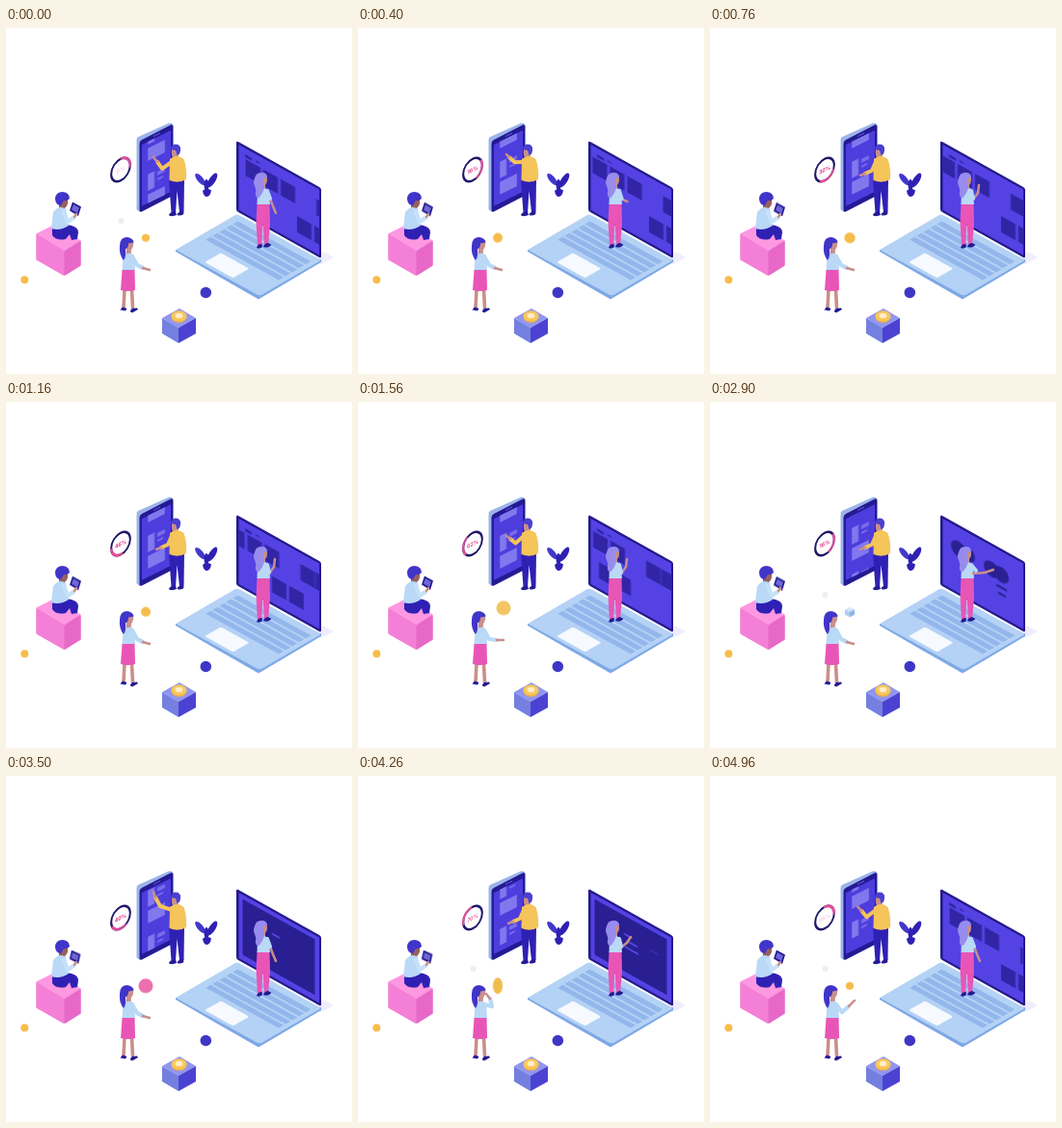
An HTML page that plays this animation: 359x359 px, repeating every 5 s.

```html
<!DOCTYPE html>
<html lang="en">
<head>
<meta charset="utf-8">
<title>Isometric workspace</title>
<style>
html, body { margin: 0; width: 100%; height: 100%; overflow: hidden; background: #fff; }
svg { display: block; width: 100%; height: 100%; }
.navy { fill: #241a94; }
.blue { fill: #2f20b4; }
.pale { fill: #b9d9f7; }
.pink { fill: #e955b6; }
.skin { fill: #c98f8a; }
.gold { fill: #f5c45a; }
.arm { fill: none; stroke-linecap: round; stroke-linejoin: round; }
.bare { stroke: #c98f8a; stroke-width: 2.5; }
.anim { animation: 5s ease-in-out infinite; }

#arc { animation: spin 2.5s linear infinite; }
@keyframes spin { from { transform: rotate(-90deg); } to { transform: rotate(270deg); } }

/* phone: three swipes per loop */
#feed { animation-name: feed; }
@keyframes feed {
  0% { transform: translateY(0); } 7%, 31.2% { transform: translateY(-13px); }
  38%, 58% { transform: translateY(-21px); } 70% { transform: translateY(-33px); }
  78%, 91% { transform: translateY(-41px); } 99%, 100% { transform: translateY(-48px); }
}
#manArm, #manHand { animation: manArm calc(5s / 3) linear infinite; }
#manHand { animation-name: manHand; }
@keyframes manArm {
  0%, 100% { d: path('M172 139L162 146L157 139'); }
  10% { d: path('M172 139L160 135L155 126'); animation-timing-function: ease-in-out; }
  45%, 74% { d: path('M172 139L168 148L161 151'); }
}
@keyframes manHand {
  0%, 100% { d: path('M157 139L153 134'); }
  10% { d: path('M155 126L153 120'); animation-timing-function: ease-in-out; }
  45%, 74% { d: path('M161 151L156 153'); }
}

/* laptop */
#tiles { animation-name: tiles; }
@keyframes tiles { 0%, 42%, 97%, 100% { opacity: 1; } 46%, 93% { opacity: 0; } }
#row1 { animation-name: row1; }
@keyframes row1 {
  0%, 60%, 100% { transform: none; } 15.2% { transform: translateX(-10px); }
  31.2%, 50% { transform: translateX(-23px); }
}
#row2 { animation-name: row2; }
@keyframes row2 {
  0%, 15.2%, 60%, 100% { transform: none; } 31.2%, 50% { transform: translateX(-52px); }
}
#discs { animation-name: discs; }
@keyframes discs { 0%, 46%, 64%, 100% { opacity: 0; } 51%, 60% { opacity: 1; } }
#night { animation-name: night; }
@keyframes night { 0%, 60%, 97%, 100% { opacity: 0; } 67%, 92% { opacity: 1; } }
.line { animation-name: line; }
@keyframes line { 0%, 68% { transform: scaleX(0); } 82%, 100% { transform: scaleX(1); } }
#ladySleeve { animation-name: ladySleeve; }
@keyframes ladySleeve {
  0%, 4%, 70%, 76%, 98%, 100% { d: path('M271 169L274 177'); }
  13%, 35%, 84%, 90% { d: path('M271 169L273 177'); }
  52%, 60% { d: path('M271 169L276 175'); }
}
#ladyArm { animation-name: ladyArm; }
@keyframes ladyArm {
  0%, 4%, 70%, 76%, 98%, 100% { d: path('M274 177L277 185L280 192'); }
  13%, 35% { d: path('M273 178L278 171L279 163'); }
  52%, 60% { d: path('M273 178L285 177L294 174'); }
  84%, 90% { d: path('M273 178L279 173L283 167'); }
}

/* presenter */
#girlSleeve { animation-name: girlSleeve; }
@keyframes girlSleeve {
  0%, 24%, 40%, 73%, 100% { d: path('M131 237L136 246L142 249'); }
  31.2% { d: path('M131 237L136 246L144 247'); }
  82%, 92% { d: path('M131 237L139 239L137 231'); }
  99.5% { d: path('M131 237L137 245L144 239'); }
}
#girlHand { animation-name: girlHand; }
@keyframes girlHand {
  0%, 24%, 40%, 73%, 100% { d: path('M142 249L149 251'); }
  31.2% { d: path('M144 247L151 247'); }
  82%, 92% { d: path('M137 231L133 226'); }
  99.5% { d: path('M144 239L150 233'); }
}

/* floating tokens */
#ball { animation-name: ball; }
@keyframes ball {
  0%, 98%, 100% { transform: scale(1); } 15.2%, 22% { transform: scale(1.38); }
  27%, 91% { transform: scale(0); }
}
#burst { animation-name: burst; }
@keyframes burst { 0%, 25%, 46%, 100% { transform: scale(0); } 31.2%, 40% { transform: scale(1); } }
#box { animation-name: box; }
@keyframes box { 0%, 47%, 64%, 100% { transform: scale(0); } 54%, 59% { transform: scale(1); } }
#rose { animation-name: rose; }
@keyframes rose { 0%, 62%, 79%, 100% { transform: scale(0); } 68%, 73% { transform: scale(1); } }
#coin { animation-name: coin; }
@keyframes coin {
  0%, 76%, 93%, 100% { transform: scale(0); } 81% { transform: scale(.9, 1); }
  85.2% { transform: scale(.6, 1); } 89% { transform: scale(.2, .8); }
}
#dot { animation-name: dot; }
@keyframes dot { 0%, 58%, 84%, 100% { opacity: 1; } 8%, 45%, 67%, 76% { opacity: 0; } }
#tablet { animation-name: tablet; }
@keyframes tablet { 0%, 31%, 100% { transform: none; } 15%, 58% { transform: translateY(.5px); } 70%, 85% { transform: rotate(-5deg); } }
</style>
</head>
<body>
<svg viewBox="0 0 359 359">
  <defs>
    <clipPath id="phoneClip"><path d="M0 0H30V64H0Z"/></clipPath>
    <clipPath id="screenClip"><path d="M2.500 2.500H86V70.500H2.500Z"/></clipPath>
    <g id="cards" fill="#8178ee">
      <path d="M6 7H24V20H6ZM6 34H13V51H6Z"/>
      <path d="M16 36H24V40H16ZM16 43H22V45H16Z" opacity=".8"/>
    </g>
  </defs>

  <!-- loose balls -->
  <circle cx="19.300" cy="261.300" r="4" fill="#f7bd4c"/>
  <circle cx="207.300" cy="274.500" r="5.800" fill="#3f36c6"/>
  <circle id="dot" class="anim" cx="119.500" cy="200" r="3" fill="#ededf5"/>

  <!-- progress ring -->
  <g transform="matrix(.87 -.42 0 1 119 147)">
    <circle r="11.300" fill="#fff" stroke="#1d1668" stroke-width="2.400"/>
    <circle id="arc" r="11.300" fill="none" stroke="#ee4f9d" stroke-width="2.400" pathLength="100" stroke-dasharray="28 72"/>
    <text id="count" y="2.300" text-anchor="middle" font-family="Inter, Roboto, sans-serif" font-size="6" font-weight="700" fill="#e2368c"></text>
  </g>

  <!-- phone -->
  <path d="M135.500 116Q135.500 114 137 113L169 98.800Q172 98.500 173 100L139 118V191L135.500 188.500Z" fill="#9db4ea"/>
  <path class="navy" d="M138.500 120Q138.500 117 141 116L171 100.500Q173.500 99.500 173.500 102V171Q173.500 173.500 171 175L141 190.500Q138.500 191.500 138.500 189Z"/>
  <g transform="matrix(1 -.5 0 1 141 121)">
    <g clip-path="url(#phoneClip)">
      <path d="M0 0H30V64H0Z" fill="#4e3ddd"/>
      <g id="feed" class="anim">
        <use href="#cards" y="-48"/><use href="#cards"/><use href="#cards" y="48"/>
      </g>
    </g>
    <path d="M12 -2.500H19" stroke="#6b61cf"/>
  </g>

  <!-- man -->
  <path class="blue" d="M169 157H185L184.500 191H180L177.500 169L176 192H171.500Z"/>
  <path class="navy" d="M169 194.500Q169 191 176 190.500L177 194Q173 196 169 194.500ZM177.500 194Q178 190.500 184 190L184.500 193Q181 195.500 177.500 194Z"/>
  <path class="skin" d="M172 125H178L179 136H174Q171 133 172 125Z"/>
  <path class="gold" d="M170 136Q177 130 184.500 136Q188 146 187 157Q179 162 169.500 158Z"/>
  <path d="M171 126Q171 121 176 120.500Q182 121 181 127Q180.500 132 177.500 132L176 127Z" fill="#4a40d0"/>
  <path id="manArm" class="arm" d="M172 139L162 146L157 139" stroke="#f5c45a" stroke-width="4"/>
  <path id="manHand" class="arm bare" d="M157 139L153 134"/>

  <!-- plant -->
  <g class="blue">
    <ellipse cx="201.500" cy="157" rx="3" ry="7.500" transform="rotate(-40 201.500 157)" fill="#4238cc"/>
    <ellipse cx="214" cy="158" rx="3.300" ry="8.500" transform="rotate(32 214 158)"/>
    <ellipse cx="208" cy="163" rx="2.500" ry="6"/>
    <path d="M204 169Q208 165 213 168.500Q212 175 208.500 175Q205 175 204 169Z"/>
  </g>

  <!-- laptop -->
  <path d="M317 239L329 232L340 238L327 245Z" fill="#efedfb"/>
  <path d="M176 230V232Q219 257 262 281.500L327 243V240Z" fill="#7fa8e6"/>
  <g transform="matrix(.87 .48 -.64 .37 240 193)">
    <rect width="100" height="100" rx="3" fill="#b4d2f5"/>
    <path d="M8 14H95M8 25H95M8 36H95M8 47H95M8 58H95" stroke="#93b7ec" stroke-width="8"/>
    <rect x="31" y="69" width="34" height="26" rx="2" fill="#f6f9fe"/>
  </g>
  <g transform="matrix(1 .557 0 1 239 117)">
    <rect width="88" height="73" rx="2" fill="#231989"/>
    <g clip-path="url(#screenClip)">
      <path d="M2 2H87V71H2Z" fill="#5442e4"/>
      <g id="tiles" class="anim" fill="#3125a6">
        <path d="M9 9H16V12H9ZM20 9H24V10.500H20Z"/>
        <g id="row1" class="anim"><path d="M10 14H25V31H10ZM28 14H43V31H28ZM46 14H61V31H46ZM83 14H98V31H83ZM98.500 14H113V31H98.500Z"/></g>
        <g id="row2" class="anim"><path d="M63 43H78V60H63ZM81 43H96V60H81Z"/></g>
      </g>
      <g id="discs" class="anim" fill="#2a2092">
        <circle cx="19" cy="25" r="8"/><circle cx="29" cy="25" r="7"/>
        <circle cx="53" cy="27" r="8"/><circle cx="63" cy="27" r="8"/>
        <path d="M58 39H69V41.500H58ZM60 46H68V48.500H60Z"/>
      </g>
      <g id="night" class="anim">
        <path d="M6.500 7H81.500V65H6.500Z" fill="#291f92"/>
        <path d="M37 25H45V27H37Z" fill="#5747de"/>
        <g fill="#5747de" style="transform-origin:38px 0" class="line anim">
          <path d="M40 31H51V33H40ZM38 38H52V40H38Z"/>
          <path d="M64 27H73V28.500H64Z" opacity=".45"/>
        </g>
      </g>
    </g>
  </g>

  <!-- woman on the laptop -->
  <path class="pink" d="M260.500 182H273.500L274 204L272 225H268L266.500 203L265 226H261L259.500 202Z"/>
  <path class="navy" d="M260 228Q261 224 265.500 224L266 227Q263 230 260 228ZM267 227Q268 223.500 272 223L275.500 225Q272 229 267 227Z"/>
  <path class="skin" d="M265 154H270.500Q272 160 269 163V168H264Z"/>
  <path class="pale" d="M261 169Q267 164 272.500 168L274 183H260.500Z"/>
  <path d="M258 156Q259 150 265 150Q271 150 271 155L267 156Q266 161 268 165Q267 171 262.500 176Q258 176 259 171Q260 168 258 164Q256 160 258 156Z" fill="#978ced"/>
  <path id="ladyArm" class="arm bare anim" d="M274 177L277 185L280 192"/>
  <path id="ladySleeve" class="arm anim" d="M271 169L274 177" stroke="#b9d9f7" stroke-width="4"/>

  <!-- seat and reader -->
  <g stroke-width="1.500" stroke-linejoin="round">
    <path d="M32 214L48 206L77 221L60 231Z" fill="#fd98e1" stroke="#fd98e1"/>
    <path d="M32 215L60 232V256L32 240Z" fill="#f47fd6" stroke="#f47fd6"/>
    <path d="M61 232L77 222V246L61 256Z" fill="#e868c8" stroke="#e868c8"/>
  </g>
  <path class="blue" d="M48 207Q58 202 68 205Q75 207 75 212L74 219L68 220L66 214L62 219Q52 221 48 215Z"/>
  <path d="M55 178H64Q65 184 61 187L60 190H55Z" fill="#95605f"/>
  <path class="pale" d="M49 191Q55 183 62 187.500L65 205Q56 211 47 208Z"/>
  <path d="M51 178Q51 170 59 170Q66 171 66 177Q63 180 60 179L57 184Q52 184 51 178Z" fill="#4035c8"/>
  <g id="tablet" class="anim" style="transform-origin:71px 192px">
    <path class="navy" d="M69 180.500L78 185.500L75 195L66 189.500Z"/>
    <path d="M70 183L76 186.500L74 192L68 188.500Z" fill="#6f67d4"/>
  </g>
  <path class="arm" d="M60 191L64 201L70 197" stroke="#c6e1fa" stroke-width="4.500"/>
  <path class="arm bare" d="M71 196L73 193"/>

  <!-- presenter -->
  <path class="arm" d="M123 271L122 290M130.500 271L131.500 291" stroke="#c98f8a" stroke-width="3.600"/>
  <path class="navy" d="M118.500 292.500L121 289.500L125.500 291L124 293.500ZM128.500 294L131 291L136 290.500L137 292L131 295.500Z"/>
  <path class="skin" d="M125 220H132Q133 227 130 230L129.500 236H125Z"/>
  <path class="pale" d="M121.500 237Q127 231 133 236L134 252H120.500Z"/>
  <path class="pink" d="M120.500 251H133.500L134 272Q126 274 119 272Z"/>
  <path d="M118 226Q118 217 126 217Q132 218 132.500 222.500L127 223.500Q127 228 124 229.500Q125 237 122 241Q117 235 118 226Z" fill="#4035c8"/>
  <path id="girlSleeve" class="arm anim" d="M131 237L136 246L142 249" stroke="#b9d9f7" stroke-width="4.200"/>
  <path id="girlHand" class="arm bare anim" d="M142 249L149 251"/>

  <!-- floating tokens -->
  <g transform="translate(145 217.700)">
    <circle id="ball" class="anim" r="4.100" fill="#f7bd4c"/>
    <g transform="translate(6 -4)"><circle id="burst" class="anim" r="7.500" fill="#f5c463"/></g>
    <g id="box" class="anim">
      <path d="M-5 -2.500L0 -5L5 -2.500L0 0Z" fill="#d3e7fb"/>
      <path d="M-5 -2.500L0 0V5.500L-5 3Z" fill="#aecdf2"/>
      <path d="M5 -2.500L0 0V5.500L5 3Z" fill="#8fb3e5"/>
    </g>
    <circle id="rose" class="anim" r="7.500" fill="#ec6fae"/>
    <circle id="coin" class="anim" r="8.500" fill="#efbd4d"/>
  </g>

  <!-- pedestal -->
  <path d="M162 301L180 291L197 301L179 311Z" fill="#9196ee"/>
  <path d="M162 301L179 311V327L162 317Z" fill="#747fe0"/>
  <path d="M197 301L179 311V327L197 317Z" fill="#4b42d2"/>
  <ellipse cx="179.500" cy="300.300" rx="8" ry="5.500" fill="#eeb045"/>
  <ellipse cx="179.500" cy="298.800" rx="8" ry="5.500" fill="#f7c75c"/>
  <ellipse cx="179.500" cy="298.500" rx="4" ry="2.700" fill="#ffeec2"/>
</svg>
<script>
const count = document.getElementById('count');
const spin = 2500;

function tick(now) {
  const p = (now % spin) / spin;
  count.textContent = Math.floor(p * 100) + '%';
  count.style.opacity = Math.max(.25, Math.min(1, p * 8, (1 - p) * 2.5));
  requestAnimationFrame(tick);
}
requestAnimationFrame(tick);
</script>
</body>
</html>
```
